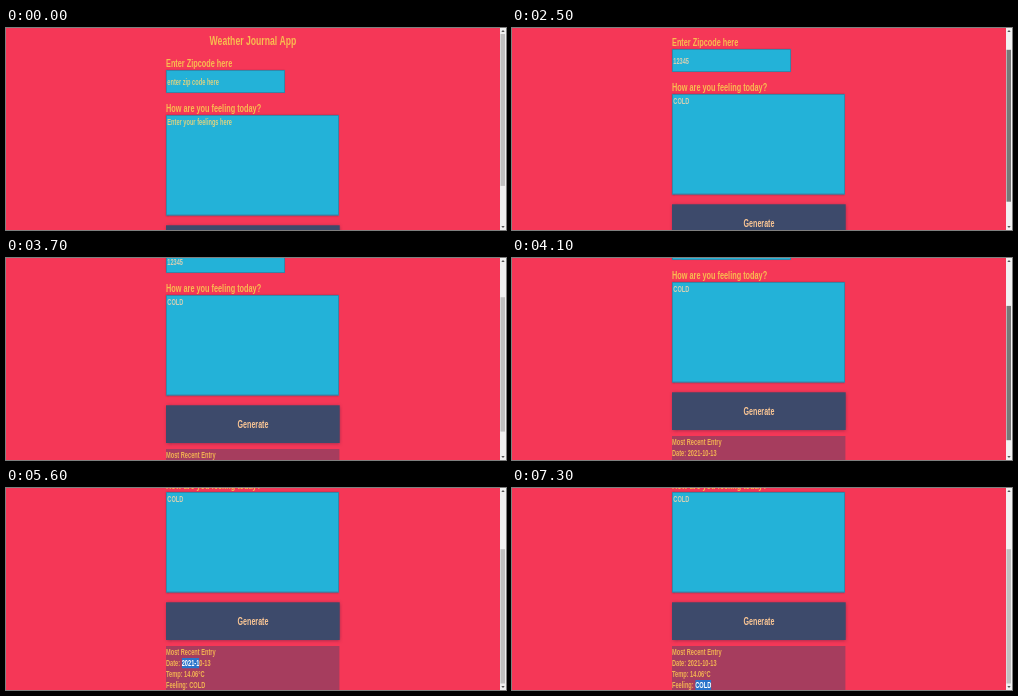
Recreate the animation shown at these times as an HTML page with a canvas. Size 500 by 202 pixels, loop 7.4 s.

```html
<!DOCTYPE html>
<html lang="en">
<head>
<meta charset="utf-8">
<title>Weather Journal App</title>
<style>
  html, body { margin: 0; width: 100%; height: 100%; overflow: hidden; background: #f53757; }
  canvas { display: block; width: 500px; height: 202px; }
</style>
</head>
<body>
<canvas id="stage" width="500" height="202"></canvas>
<script>
const ctx = document.getElementById('stage').getContext('2d');
const LOOP = 7400, STEP = 100;
const WIDTH = 500, HEIGHT = 202, LEFT = 160;
const CONDENSE = 0.665; // one ratio for the whole narrow typeface
const FACE = '"Liberation Sans", Arial, sans-serif';

const COLOR = {
  page: '#f53757', field: '#23b2d8', edge: 'rgba(70, 95, 125, 0.5)',
  button: '#3d4a6b', panel: '#a63d5e',
  heading: '#f8bc50', hint: '#dcd283', typed: '#d3cfb4',
  action: '#fcc795', entry: '#f2b252', selection: '#2a74cb'
};

// Scroll offset over time: [ms, px]
const SCROLL = [[2200, 0], [2500, 21], [2900, 50], [3900, 50], [4100, 63], [4400, 83]];
const DATA_AT = 3700;

const ENTRIES = [
  { label: 'Most Recent Entry', value: '', y: 247 },
  { label: 'Date: ', value: '2021-10-13', y: 258, from: 5000, until: 6100 },
  { label: 'Temp: ', value: '14.06°C', y: 269, from: 6100, until: 6800 },
  { label: 'Feeling: ', value: 'COLD', y: 280, from: 6800, until: LOOP }
];

function scrollAt(t) {
  if (t <= SCROLL[0][0]) return 0;
  for (let i = 1; i < SCROLL.length; i++) {
    const [t0, a] = SCROLL[i - 1], [t1, b] = SCROLL[i];
    if (t <= t1) return Math.round(a + (b - a) * (t - t0) / (t1 - t0));
  }
  return SCROLL[SCROLL.length - 1][1];
}

function typed(word, t, start, pace) {
  return word.slice(0, Math.max(0, Math.floor((t - start) / pace) + 1));
}

function rect(x, y, w, h, color) {
  ctx.fillStyle = color;
  ctx.fillRect(x, y, w, h);
}

function setFont(size) {
  ctx.font = 'bold ' + size + 'px ' + FACE;
}

function textWidth(str, size) {
  setFont(size);
  return ctx.measureText(str).width * CONDENSE;
}

// y is the middle of the capitals
function text(str, x, y, size, color, align = 'left') {
  ctx.save();
  ctx.translate(x, y + size * 0.36);
  ctx.scale(CONDENSE, 1);
  setFont(size);
  ctx.textAlign = align;
  ctx.fillStyle = color;
  ctx.fillText(str, 0, 0);
  ctx.restore();
}

function shadowed(x, y, w, h, color, blur, offset) {
  ctx.save();
  ctx.shadowColor = 'rgba(60, 30, 60, 0.6)';
  ctx.shadowBlur = blur;
  ctx.shadowOffsetX = ctx.shadowOffsetY = offset;
  rect(x, y, w, h, color);
  ctx.restore();
}

function field(y, w, h, textY, value, hint) {
  shadowed(LEFT, y, w, h, COLOR.field, 1.5, 0.3);
  ctx.strokeStyle = COLOR.edge;
  ctx.lineWidth = 1;
  ctx.strokeRect(LEFT + 0.5, y + 0.5, w - 1, h - 1);
  text(value || hint, LEFT + 1.3, textY, 8.5, value ? COLOR.typed : COLOR.hint);
}

function entryLine({ label, value, y, from, until }, t) {
  const size = 8.5;
  const x = LEFT + textWidth(label, size);
  text(label, LEFT, y, size, COLOR.entry);
  text(value, x, y, size, COLOR.entry);
  if (!(t >= from && t < until)) return;
  const picked = value.slice(0, Math.floor((t - from) / 100));
  const w = textWidth(picked, size);
  ctx.save();
  ctx.beginPath();
  ctx.rect(x, y - 5, w, 10.5);
  ctx.clip();
  rect(x, y - 5, w, 10.5, COLOR.selection);
  text(value, x, y, size, '#fff');
  ctx.restore();
}

function arrow(y, dir) {
  ctx.fillStyle = '#555';
  ctx.beginPath();
  ctx.moveTo(495.3, y + dir);
  ctx.lineTo(498.7, y + dir);
  ctx.lineTo(497, y - dir);
  ctx.fill();
}

function scrollbar(t, scroll, pageHeight) {
  const top = 6, track = 189.5;
  const dragging = (t >= 2200 && t < 2950) || (t >= 3900 && t < 4450);
  const hovering = t >= 2950 && t < 3300;
  const shade = dragging ? '#787878' : hovering ? '#a8a8a8' : '#c1c1c1';
  rect(494, 0, 6, HEIGHT, '#f1f1f1');
  rect(494.5, top + scroll / pageHeight * track, 4.5, HEIGHT / pageHeight * track, shade);
  arrow(3, 1);
  arrow(199, -1);
}

function draw(t) {
  const scroll = scrollAt(t);
  const loaded = t >= DATA_AT;
  const pageHeight = loaded ? 285 : 252;

  rect(0, 0, WIDTH, HEIGHT, COLOR.page);
  ctx.save();
  ctx.translate(0, -scroll);

  text('Weather Journal App', 247, 12.5, 13, COLOR.heading, 'center');
  text('Enter Zipcode here', LEFT, 35, 11, COLOR.heading);
  field(42, 119, 23, 54, typed('12345', t, 600, 100), 'enter zip code here');
  text('How are you feeling today?', LEFT, 80, 11, COLOR.heading);
  field(87, 173, 100.5, 94, typed('COLD', t, 1300, 200), 'Enter your feelings here');

  shadowed(LEFT, 197.3, 173.7, 37.7, COLOR.button, 3.5, 0.5);
  text('Generate', 247, 216, 10.7, COLOR.action, 'center');

  rect(LEFT, 241, 173.4, pageHeight - 241, COLOR.panel);
  ENTRIES.slice(0, loaded ? ENTRIES.length : 1).forEach(line => entryLine(line, t));
  ctx.restore();

  scrollbar(t, scroll, pageHeight);
}

function tick() {
  const t = performance.now() % LOOP;
  draw(Math.floor(t / STEP) * STEP);
  requestAnimationFrame(tick);
}
tick();
</script>
</body>
</html>
```
